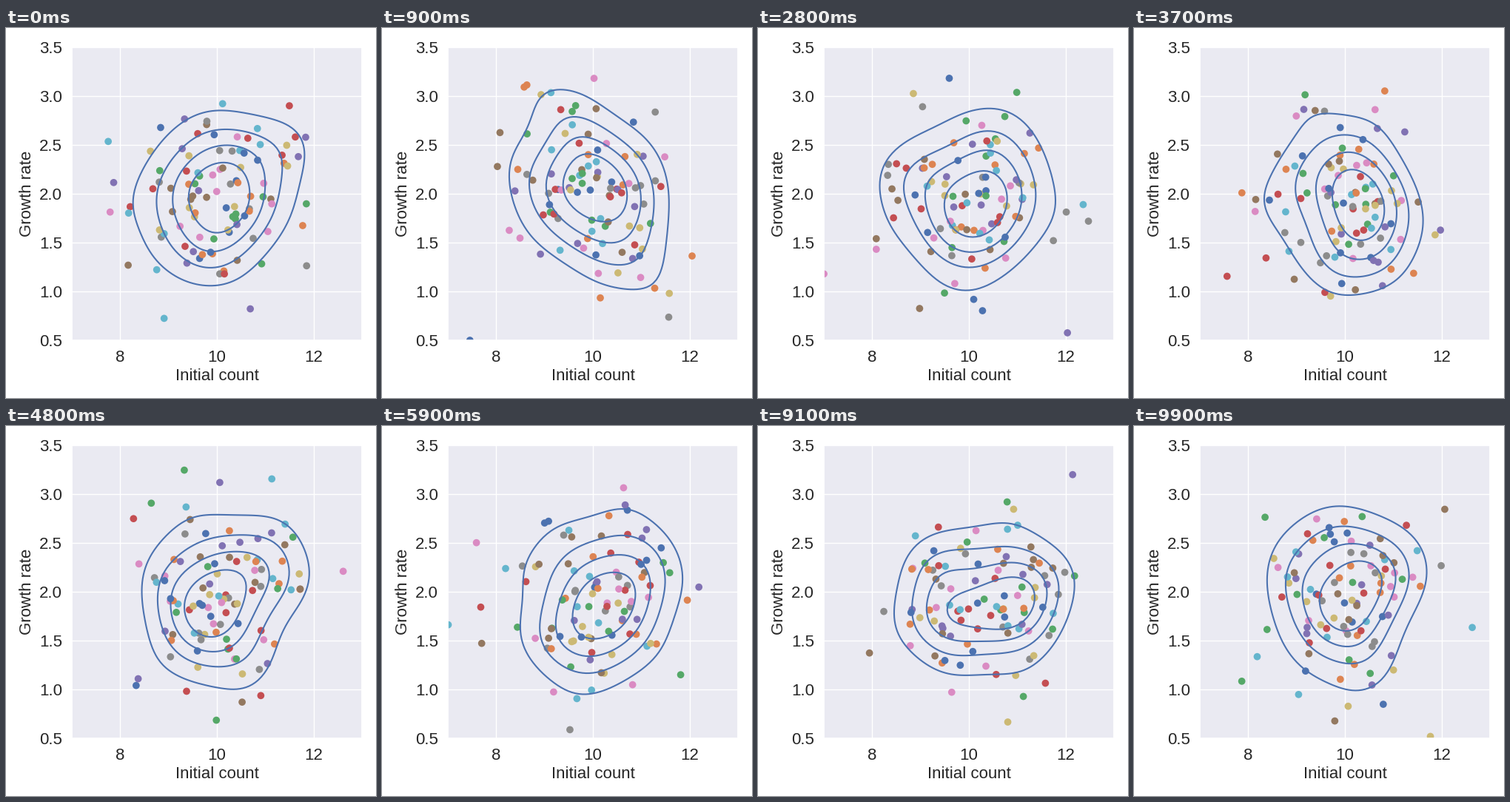
A matplotlib script that plays this animation: 500 by 500 pixels, repeating every 10000 ms.

```python
import matplotlib.pyplot as plt
import numpy as np
from matplotlib.animation import FuncAnimation

FRAMES, INTERVAL = 100, 100
N = 100
MEAN, SPREAD = (10.07, 1.92), (0.98, 0.5)
PALETTE = ["#4C72B0", "#DD8452", "#55A868", "#C44E52", "#8172B3",
           "#937860", "#DA8BC3", "#8C8C8C", "#CCB974", "#64B5CD"]
INK = "0.15"
SMOOTH = 1.3  # bandwidth relative to Scott's rule

plt.rcParams["font.family"] = "Liberation Sans"


def draw_points(k):
    return np.random.default_rng(k).normal(MEAN, SPREAD, (N, 2))


def density(pts, size=120):
    """Gaussian kernel density of the points on a grid."""
    cov = np.cov(pts.T) * (SMOOTH * N ** (-1 / 6)) ** 2
    pad = 3 * np.sqrt(np.diag(cov))
    lo, hi = pts.min(0) - pad, pts.max(0) + pad
    gx, gy = np.meshgrid(np.linspace(lo[0], hi[0], size),
                         np.linspace(lo[1], hi[1], size))
    white = np.linalg.inv(np.linalg.cholesky(cov))
    mid = pts.mean(0)
    g = (np.column_stack([gx.ravel(), gy.ravel()]) - mid) @ white.T
    p = (pts - mid) @ white.T
    d2 = (g ** 2).sum(1)[:, None] + (p ** 2).sum(1) - 2 * g @ p.T
    return gx, gy, np.exp(-d2 / 2).sum(1).reshape(gx.shape)


def mass_levels(dens, shares=(0.29, 0.49, 0.67, 0.84)):
    """Densities below which the given shares of the mass lie."""
    v = np.sort(dens.ravel())
    cum = np.cumsum(v) / v.sum()
    return v[np.searchsorted(cum, shares)]


fig = plt.figure(figsize=(5, 5), dpi=100, facecolor="white")
ax = fig.add_axes([0.178, 0.157, 0.784, 0.791], facecolor="#EAEAF2")
ax.set(xlim=(7, 13), ylim=(0.5, 3.5), xticks=[8, 10, 12],
       yticks=np.arange(0.5, 3.6, 0.5))
ax.set_axisbelow(True)
ax.grid(color="white", lw=1)
ax.tick_params(length=0, pad=9.5, labelsize=16, labelcolor=INK)
ax.set_xlabel("Initial count", fontsize=16, color=INK, labelpad=2.8)
ax.set_ylabel("Growth rate", fontsize=16, color=INK)
for spine in ax.spines.values():
    spine.set(color="white", linewidth=1.25)

dots = ax.scatter(np.full(N, MEAN[0]), np.full(N, MEAN[1]), s=49,
                  linewidths=0, zorder=2,
                  c=[PALETTE[i % len(PALETTE)] for i in range(N)])
rings = []


def update(k):
    while rings:
        rings.pop().remove()
    pts = draw_points(k)
    dots.set_offsets(pts)
    gx, gy, dens = density(pts)
    rings.append(ax.contour(gx, gy, dens, levels=mass_levels(dens),
                            colors=PALETTE[0], linewidths=1.5, zorder=2.2))
    return []


anim = FuncAnimation(fig, update, frames=FRAMES, interval=INTERVAL,
                     init_func=lambda: [], repeat=True, repeat_delay=0)
plt.show()
```
